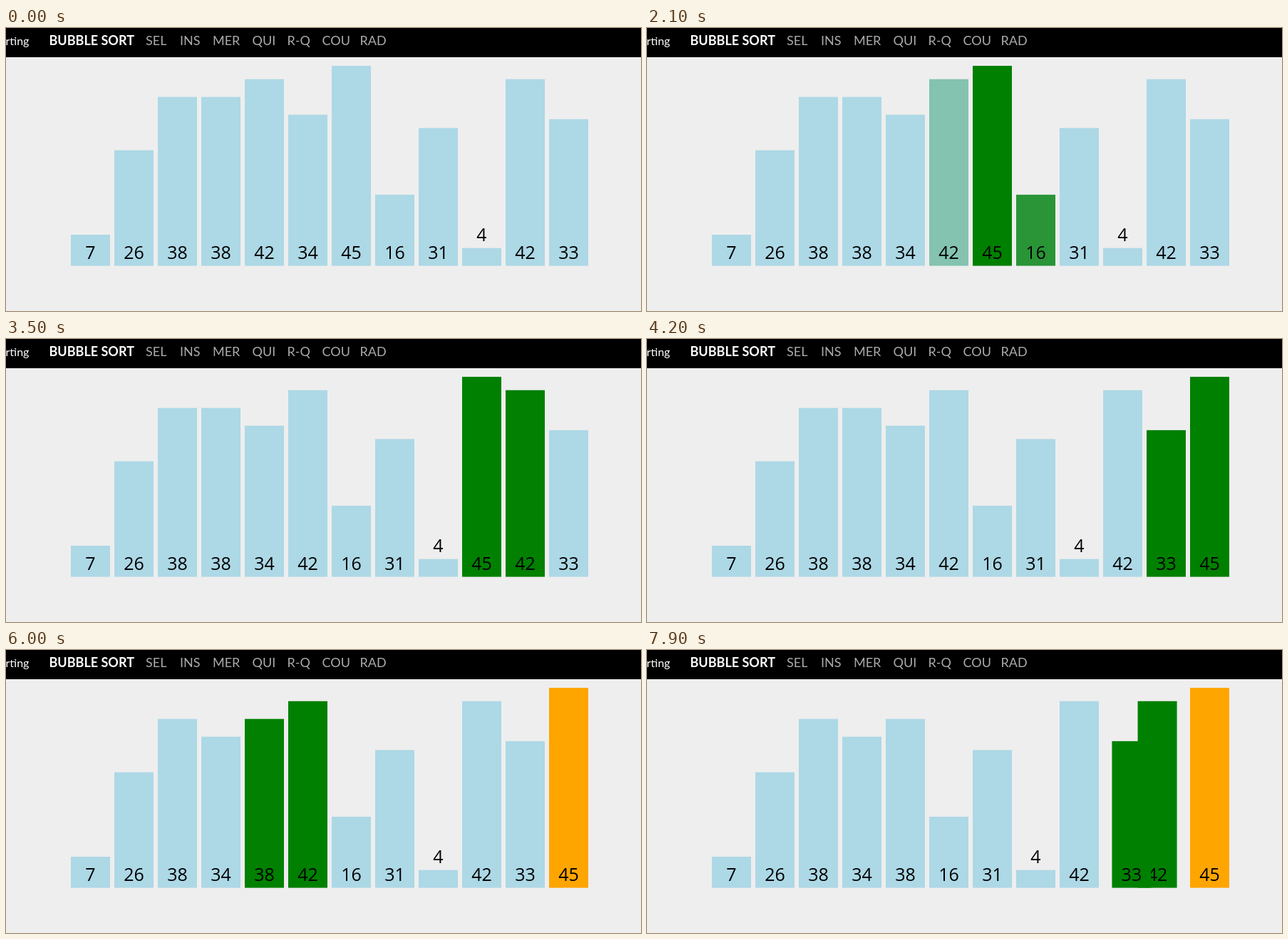
An HTML page that plays this animation: 891 by 397 pixels, repeating every 8 s.

```html
<!DOCTYPE html>
<html lang="en">
<head>
<meta charset="utf-8">
<title>Bubble sort</title>
<style>
  html, body { margin: 0; width: 100%; height: 100%; overflow: hidden; background: #eee; }
  svg { display: block; }
  .menu { font: 18px Lato, sans-serif; fill: #aaa; }
  .menu .brand { font-size: 16px; fill: #fff; }
  .menu .active { font-weight: bold; fill: #fff; }
  .bars { font: 25px "Open Sans", "Noto Sans", sans-serif; text-anchor: middle; }
</style>
</head>
<body>
<svg width="891" height="397" viewBox="0 0 891 397">
  <rect width="891" height="397" fill="#eee"/>
  <rect width="891" height="41" fill="#000"/>
  <g class="menu">
    <text class="brand" x="-0.5" y="24">rting</text>
    <text class="active" x="60.5" y="24">BUBBLE SORT</text>
    <text x="196" y="24">SEL</text>
    <text x="244" y="24">INS</text>
    <text x="290" y="24">MER</text>
    <text x="345.5" y="24">QUI</text>
    <text x="394.5" y="24">R-Q</text>
    <text x="443.5" y="24">COU</text>
    <text x="496.5" y="24">RAD</text>
  </g>
  <g class="bars"></g>
</svg>
<script>
const values = [7, 26, 38, 38, 42, 34, 45, 16, 31, 4, 42, 33];
const LOOP = 8000, TICK = 100, START = 404, STEP = 222.9;
const LEFT = 91, PITCH = 61, WIDTH = 55, BOTTOM = 333.6, UNIT = 6.234;
const BLUE = [173, 216, 230], GREEN = [0, 128, 0], ORANGE = [255, 165, 0];

// Every state holds the slot and the colour of each bar.
function sortStates() {
  const order = values.map((_, i) => i);
  const sorted = new Set();
  const states = [];
  const push = (...active) => states.push(values.map((_, bar) => ({
    slot: order.indexOf(bar),
    color: sorted.has(bar) ? ORANGE : active.includes(bar) ? GREEN : BLUE
  })));

  push();
  for (let end = order.length - 1; end > 0; end--) {
    for (let i = 0; i < end; i++) {
      const a = order[i], b = order[i + 1];
      push(a, b);
      if (values[a] > values[b]) {
        order[i] = b;
        order[i + 1] = a;
        push(a, b);
      }
    }
    sorted.add(order[end]);
    push();
    push(); // pause before the next pass
  }
  return states;
}

function add(parent, name, attrs) {
  const node = document.createElementNS(parent.namespaceURI, name);
  for (const key in attrs) node.setAttribute(key, attrs[key]);
  return parent.appendChild(node);
}

const layer = document.querySelector(".bars");
const bars = values.map(value => {
  const height = value * UNIT, top = BOTTOM - height;
  const group = add(layer, "g");
  const rect = add(group, "rect", { y: top, width: WIDTH, height });
  const label = add(group, "text", { x: WIDTH / 2, y: height < 30 ? top - 9.5 : 324 });
  label.textContent = value;
  return { group, rect };
});

const states = sortStates();
const ease = p => p < 0.5 ? 4 * p ** 3 : 1 - 4 * (1 - p) ** 3;
const mix = (a, b, p) => a + (b - a) * p;

function draw(time) {
  const progress = Math.max(0, (time - START) / STEP);
  const index = Math.floor(progress);
  const p = ease(progress - index);
  bars.forEach(({ group, rect }, i) => {
    const from = states[index][i], to = states[index + 1][i];
    const x = LEFT + PITCH * mix(from.slot, to.slot, p);
    const color = from.color.map((c, k) => Math.round(mix(c, to.color[k], p)));
    group.setAttribute("transform", `translate(${x} 0)`);
    rect.setAttribute("fill", `rgb(${color})`);
  });
}

// The picture advances ten times a second.
function frame() {
  const time = performance.now() % LOOP;
  draw(Math.floor(time / TICK) * TICK);
  requestAnimationFrame(frame);
}
frame();
</script>
</body>
</html>
```
